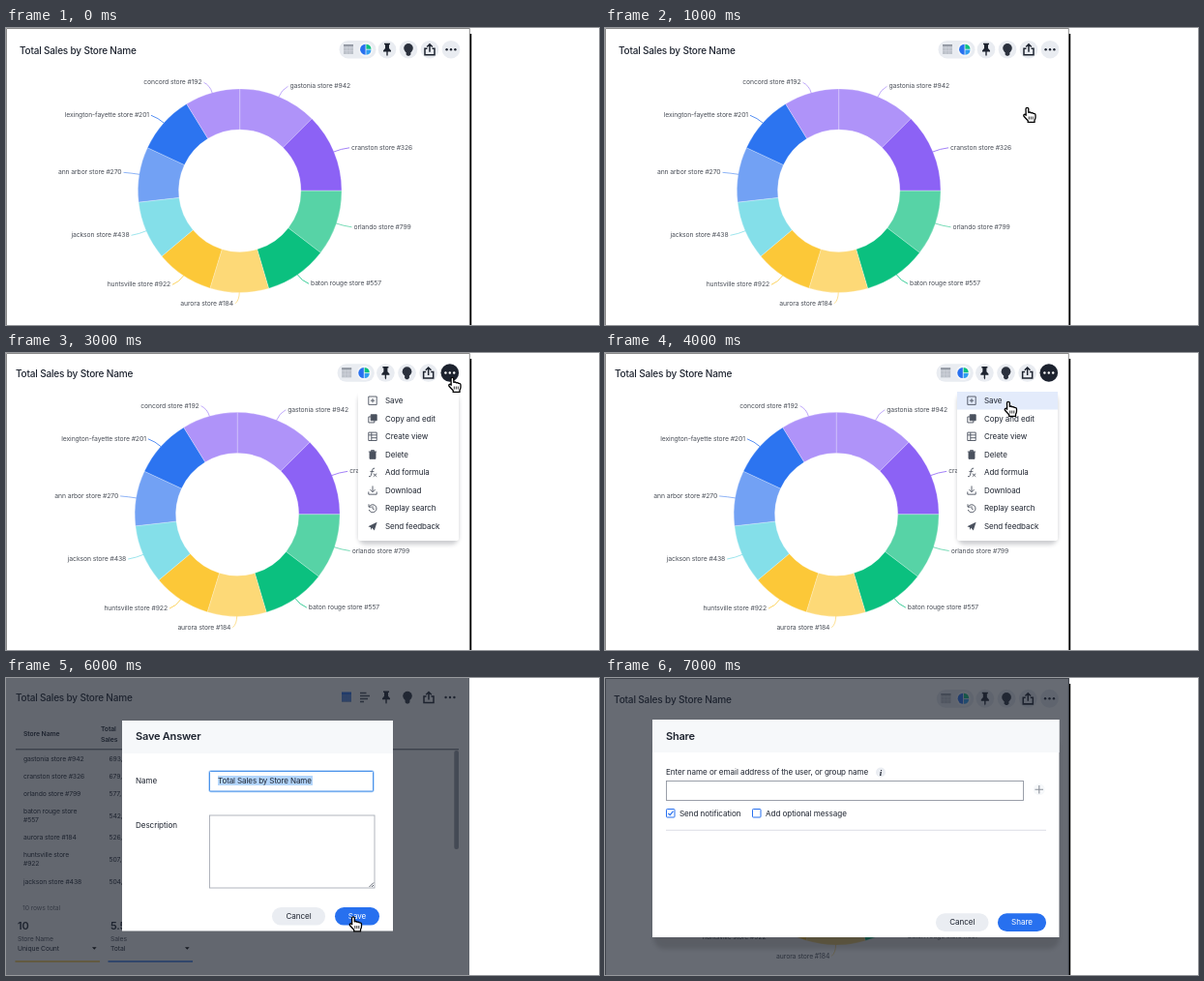
An HTML page that plays this animation: 613 by 307 pixels, repeating every 8 s.

```html
<!DOCTYPE html>
<html lang="en">
<head>
<meta charset="utf-8">
<title>Save and share an answer</title>
<style>
html, body { margin: 0; width: 100%; height: 100%; overflow: hidden; background: #fff; }
svg { display: block; width: 100%; height: 100%; font-family: Inter, "Liberation Sans", sans-serif; }
text { fill: #1d232f; white-space: pre; }
.title { font-size: 10px; font-weight: 500; letter-spacing: -.18px; }
.small { font-size: 6.8px; letter-spacing: -.1px; }
.chart .small { fill: #4a4f58; }
.ui { font-size: 8.1px; letter-spacing: -.07px; }
.menu { font-size: 8px; letter-spacing: -.06px; }
.head { font-size: 11px; font-weight: 600; letter-spacing: -.2px; }
.bold { font-weight: 600; }
.mid { text-anchor: middle; }
.end { text-anchor: end; }
.line { fill: none; stroke: #4a515e; stroke-width: .9; }
</style>
</head>
<body>
<svg viewBox="0 0 613 307" preserveAspectRatio="none">
  <defs>
    <filter id="soft" x="-20%" y="-20%" width="140%" height="140%"><feGaussianBlur stdDeviation="2.2"/></filter>
    <clipPath id="window"><rect width="480" height="307"/></clipPath>
    <g id="pin"><path d="M-3-6.5H3V-5H2V-1.2L4 1V2.3H.7V5.5L0 7L-.7 5.5V2.3H-4V1L-2-1.2V-5H-3z" fill="#1d232f"/></g>
    <g id="bulb" fill="#2b313d"><circle cy="-1.4" r="4.8"/><path d="M-2.4 2H2.4V5.2L1 6.6H-1L-2.4 5.2z"/></g>
    <g id="share" fill="none" stroke="#1d232f" stroke-width="1.5">
      <path d="M-2.5-1H-5V5.5H5V-1H2.5M0 2.5V-5M-2.8-2.7L0-5.5L2.8-2.7"/>
    </g>
    <g id="dots"><circle cx="-4.4" r="1.2"/><circle r="1.2"/><circle cx="4.4" r="1.2"/></g>
    <g id="grid"><rect x="-5" y="-5" width="10" height="10" fill="#bcc1c9"/>
      <path d="M-5-1.6H5M-5 1.6H5M-1.7-3V5M1.7-3V5" stroke="#d5d9e0" stroke-width=".5"/></g>
    <g id="chart" class="chart"></g>
  </defs>

  <g id="frame">
    <path d="M.5 307V.5H479.3V307" fill="none" stroke="#8a8a8a"/>
    <rect x="479.6" y="6" width="1.6" height="301"/>
  </g>

  <g id="page"><use href="#chart"/></g>

  <g id="menu">
    <circle cx="458.8" cy="20.5" r="9.3" fill="#1d232f"/>
    <use href="#dots" x="458.8" y="20.5" fill="#fff"/>
    <rect x="364" y="42" width="104" height="156" rx="8" fill="#1d232f" opacity=".22" filter="url(#soft)"/>
    <rect x="364" y="38" width="104" height="156" rx="2" fill="#fff"/>
    <rect id="hover" x="364" y="40" width="104" height="18.5" fill="#e3ebfb"/>
    <g id="items"></g>
  </g>

  <g id="save">
    <g id="table"></g>
    <rect width="479" height="307" fill="#1d232f" opacity=".69"/>
    <rect x="120" y="44" width="280" height="217.5" fill="#fff"/>
    <rect x="120" y="44" width="280" height="34" fill="#f6f8fa"/>
    <text class="head" x="134" y="64">Save Answer</text>
    <text class="ui" x="134" y="109">Name</text>
    <text class="ui" x="134" y="154.5">Description</text>
    <rect x="210.5" y="96.5" width="169" height="20.5" rx="1.5" fill="none" stroke="#a9cdf8" stroke-width="2.4"/>
    <rect x="210.5" y="96.5" width="169" height="20.5" rx="1" fill="#fff" stroke="#4b93ea"/>
    <rect x="219" y="101" width="98" height="10" fill="#b3d5fb"/>
    <text class="ui" x="219" y="108.7" style="font-size:8px;letter-spacing:-.1px">Total Sales by Store Name</text>
    <rect x="210.5" y="142" width="170.5" height="75" fill="#fff" stroke="#a8adb6" stroke-width=".9"/>
    <path d="M375.5 216L380 211.5M378 216L380 214" class="line" stroke-width=".7"/>
  </g>

  <g id="send">
    <g clip-path="url(#window)">
      <use href="#chart" transform="matrix(1.01 0 0 1.0135 -5.1 -1.2)"/>
      <rect width="480" height="307" fill="#1d232f" opacity=".67"/>
      <rect x="50" y="60" width="420" height="220" rx="12" opacity=".12" filter="url(#soft)"/>
    </g>
    <rect x="49" y="43" width="420.5" height="225" fill="#fff"/>
    <rect x="49" y="43" width="420.5" height="34" fill="#f6f8fa"/>
    <text class="head" x="63" y="63.5">Share</text>
    <text class="ui" x="63" y="100">Enter name or email address of the user, or group name</text>
    <circle cx="285" cy="97.5" r="5" fill="#eaedf2"/>
    <text class="mid bold" x="285" y="101" style="font:italic bold 9px 'Liberation Serif',serif">i</text>
    <rect x="63.5" y="106.5" width="369" height="20" fill="#fff" stroke="#9095a0" stroke-width=".9"/>
    <circle cx="448.8" cy="115.2" r="6" fill="#f6f8fa"/>
    <path d="M444.5 115.2H453M448.8 111V119.5" stroke="#8c919b" stroke-width="1.1"/>
    <g fill="#fff" stroke="#2770ef">
      <rect x="63.5" y="135.5" width="8.5" height="8.5" rx=".8"/>
      <rect x="152.5" y="135.5" width="8.5" height="8.5" rx=".8"/>
      <path d="M65.3 139.8L67.2 141.7L70.5 137.7" fill="none" stroke-width="1.2"/>
    </g>
    <text class="ui" x="77" y="142.5">Send notification</text>
    <text class="ui" x="166" y="142.5">Add optional message</text>
    <path d="M63 157.3H456" stroke="#d8dbe2" stroke-width=".9"/>
  </g>

  <g id="cursor" stroke="#000" stroke-linejoin="round">
    <path d="M4 2.7a1.4 1.4 0 0 1 2.8 0V6.3q1.8-.8 2.5.5q1.7-.7 2.4.6q2.3-.3 2.3 1.8v2q0 1.6-1 3.2v2H6.2v-1.7Q4.5 13 2 10.2Q1.3 8.8 2.6 8.3q.8-.2 1.6.9z" fill="#fff" stroke-width="1.3"/>
    <path d="M7.3 10.5V13.5M9.3 10.5V13.5M11.3 10.5V13.5" stroke-width=".8"/>
  </g>
</svg>

<script>
const $ = id => document.getElementById(id);
const add = (id, markup) => $(id).insertAdjacentHTML('beforeend', markup);
const text = (x, y, s, cls, extra = '') => `<text class="${cls}" x="${x}" y="${y}" ${extra}>${s}</text>`;
const icon = (name, x, y, extra = '') => `<use href="#${name}" x="${x}" y="${y}" ${extra}/>`;

// Donut: name, end angle, colour, label anchor x, label centre y
const slices = [
  ['gastonia store #942', 45, '#af93f9', 293.5, 60],
  ['cranston store #326', 90, '#8c62f5', 357, 123.5],
  ['orlando store #799', 127.5, '#57d3a6', 359.5, 205.5],
  ['baton rouge store #557', 163.5, '#0bc07f', 315, 264],
  ['aurora store #184', 197, '#fdd977', 235, 284.5],
  ['huntsville store #922', 230, '#fcc838', 170, 265],
  ['jackson store #438', 263.5, '#84dfe9', 127.5, 214],
  ['ann arbor store #270', 295, '#72a1f4', 119.5, 149],
  ['lexington-fayette store #201', 328.5, '#2c74f0', 148, 90],
  ['concord store #192', 360, '#af93f9', 202.5, 56]
];
const polar = (deg, r) => {
  const a = deg * Math.PI / 180;
  return `${(241.7 + r * Math.sin(a)).toFixed(2)} ${(168.2 - r * Math.cos(a)).toFixed(2)}`;
};

function drawChart() {
  let from = 0, out = text(14, 26.7, 'Total Sales by Store Name', 'title');
  for (const [name, to, color, x, y] of slices) {
    const mid = (from + to) / 2, right = mid < 180;
    out += `<path d="M${polar(from, 105.3)}A105.3 105.3 0 0 1 ${polar(to, 105.3)}L${polar(to, 63.2)}A63.2 63.2 0 0 0 ${polar(from, 63.2)}z" fill="${color}" stroke="#fff" stroke-width=".25"/>
      <path d="M${x + (right ? -2 : 2)} ${y + .3}Q${polar(mid, 113)} ${polar(mid, 105)}" fill="none" stroke="${color}" stroke-width=".8"/>`
      + text(x, y + 2.4, name, right ? 'small' : 'small end');
    from = to;
  }
  out += '<rect x="344.5" y="13" width="38" height="18.5" rx="9.2" fill="#e9ecf1"/>'
    + icon('grid', 354, 22) + '<path d="M349 17.8H359" stroke="#8b919c" stroke-width="1.6"/>'
    + '<circle cx="372" cy="22.2" r="7.5" fill="#f4f6f9"/>'
    + '<path d="M371.6 16.7a5.5 5.5 0 0 0 0 11z" fill="#2770ef"/>'
    + '<path d="M372.4 16.7a5.5 5.5 0 0 1 5.1 5.1H372.4z" fill="#0bc07f"/>'
    + '<path d="M372.4 22.6h5.1a5.5 5.5 0 0 1-5.1 5.1z" fill="#2f9df0"/>';
  ['pin', 'bulb', 'share', 'dots'].forEach((name, i) => {
    const x = 394 + 22 * i;
    out += `<circle cx="${x}" cy="22.2" r="9.3" fill="#e9ecf1"/>` + icon(name, x, 22.2, 'fill="#1d232f"');
  });
  add('chart', out);
}

function drawMenu() {
  const items = [
    ['Save', '<path d="M-4.2-4.2H4.2V4.2H-4.2zM0-2.2V2.2M-2.2 0H2.2"/>'],
    ['Copy and edit', '<path d="M-1.8-4H4.2V2H-1.8z" fill="#4a515e"/><path d="M-2-1.8H-4.2V4.2H1.8V2.2"/>'],
    ['Create view', '<path d="M-4.2-4.2H4.2V4.2H-4.2zM-4.2-1.5H4.2M-1.2-4.2V4.2M-1.2 1.4H4.2"/>'],
    ['Delete', '<path d="M-3-2.5H3V4.5H-3zM-4.2-2.8H4.2M-1.5-3V-4.2H1.5V-3" fill="#4a515e"/>'],
    ['Add formula', '<path d="M2.2-4.2Q0-5-.5-2L-1.6 3Q-2 5-4 4.2M-2.6-1H1.4M.8 1.2L4.2 4.4M4.2 1.2L.8 4.4"/>'],
    ['Download', '<path d="M0-4.5V1.6M-2.6-.9L0 1.8L2.6-.9M-4.2 1.5V4.2H4.2V1.5"/>'],
    ['Replay search', '<path d="M-3.6-1.5A4 4 0 1 1-3.8 1.5M-4-4.2V-1.3H-1.2M0-2.2V.4L1.8 1.4"/>'],
    ['Send feedback', '<path d="M-4.6.2L4.6-4.2L1.8 4.4L-.6 1.8L-2 4V1.2z" fill="#4a515e" stroke="none"/>']
  ];
  items.forEach(([name, art], i) => {
    const y = 49.2 + 18.55 * i;
    add('items', `<g class="line" transform="translate(379 ${y})">${art}</g>` + text(392, y + 2.8, name, 'menu'));
  });
}

function drawTable() {
  let out = '<rect width="479" height="307" fill="#fff"/>'
    + text(10, 24, 'Total Sales by Store Name', 'title')
    + text(18, 60, 'Store Name', 'small bold') + text(98, 55, 'Total', 'small bold') + text(98, 66, 'Sales', 'small bold')
    + '<path d="M10 73.8H468" stroke="#4a515e"/><rect x="463.3" y="75" width="4.7" height="102" rx="2" fill="#9da2ab"/>'
    + icon('grid', 352, 20) + '<path d="M347-16" /><rect x="347" y="15" width="10" height="9.5" fill="#2770ef" opacity=".7"/>'
    + '<rect x="347" y="14.5" width="10" height="2.5" fill="#2770ef"/>'
    + '<path d="M366 15.5H372.5M366 18.5H376M366 21.5H374M366 24.5H370" stroke="#4a515e" stroke-width="1.7"/>';
  ['pin', 'bulb', 'share', 'dots'].forEach((name, i) => out += icon(name, 393 + 22 * i, 20, 'fill="#1d232f"'));
  const rows = [
    [84, 693, 'gastonia store #942'], [102, 679, 'cranston store #326'], [120, 577, 'orlando store #799'],
    [142.5, 542, 'baton rouge store', '#557'], [165, 526, 'aurora store #184'],
    [187.5, 507, 'huntsville store', '#922'], [210.5, 504, 'jackson store #438']
  ];
  for (const [y, value, ...lines] of rows) {
    lines.forEach((s, i) => out += text(18, y + 2.4 + (i - (lines.length - 1) / 2) * 9, s, 'small'));
    out += text(106.5, y + 2.4, value + ',', 'small');
  }
  out += text(17, 239.5, '10 rows total', 'small', 'opacity=".65"');
  for (const [x, count, name, kind, color] of [
    [12, '10', 'Store Name', 'Unique Count', '#fcc838'], [108, '5.5', 'Sales', 'Total', '#2770ef']
  ]) {
    out += text(x, 260, count, 'head') + text(x, 272, name, 'small', 'opacity=".8"') + text(x, 281.7, kind, 'small')
      + `<path d="M${x + 77} 278.3h4.6l-2.3 2.5z"/><path d="M${x - 2.5} 293H${x + 85}" stroke="${color}" stroke-width="1.4"/>`;
  }
  add('table', out);
}

function button(id, x, y, w, label, primary) {
  add(id, `<rect x="${x}" y="${y}" width="${w}" height="18.6" rx="9.3" fill="${primary ? '#2770ef' : '#eaedf2'}"/>`
    + text(x + w / 2, y + 12.1, label, 'ui mid', primary ? 'style="fill:#fff"' : ''));
}

drawChart();
drawMenu();
drawTable();
button('save', 275, 237, 55, 'Cancel');
button('save', 340, 237, 46, 'Save', true);
button('send', 342, 243.3, 54.5, 'Cancel');
button('send', 406, 243.3, 50, 'Share', true);

// One step per second: visible layers and cursor position
const steps = [
  ['page frame'],
  ['page frame', 431, 81],
  ['page frame', 456, 24],
  ['page frame menu', 456, 24],
  ['page frame menu hover', 411.5, 49],
  ['save'],
  ['save', 353.5, 245.5],
  ['send frame']
];
const layers = ['page', 'frame', 'menu', 'hover', 'save', 'send'];
let shown = -1;

function show(now) {
  const n = Math.floor(now / 1000) % steps.length;
  if (n !== shown) {
    shown = n;
    const [names, x, y] = steps[n], on = names.split(' ');
    for (const id of layers) $(id).style.display = on.includes(id) ? '' : 'none';
    $('page').setAttribute('transform', on.includes('menu') ? 'matrix(1.0063 0 0 1.002 -4.1 -1.7)' : '');
    $('cursor').style.display = x === undefined ? 'none' : '';
    if (x !== undefined) $('cursor').setAttribute('transform', `translate(${x} ${y})`);
  }
}
const start = performance.now();
function tick() {
  show(performance.now() - start);
  requestAnimationFrame(tick);
}
tick();
</script>
</body>
</html>
```
